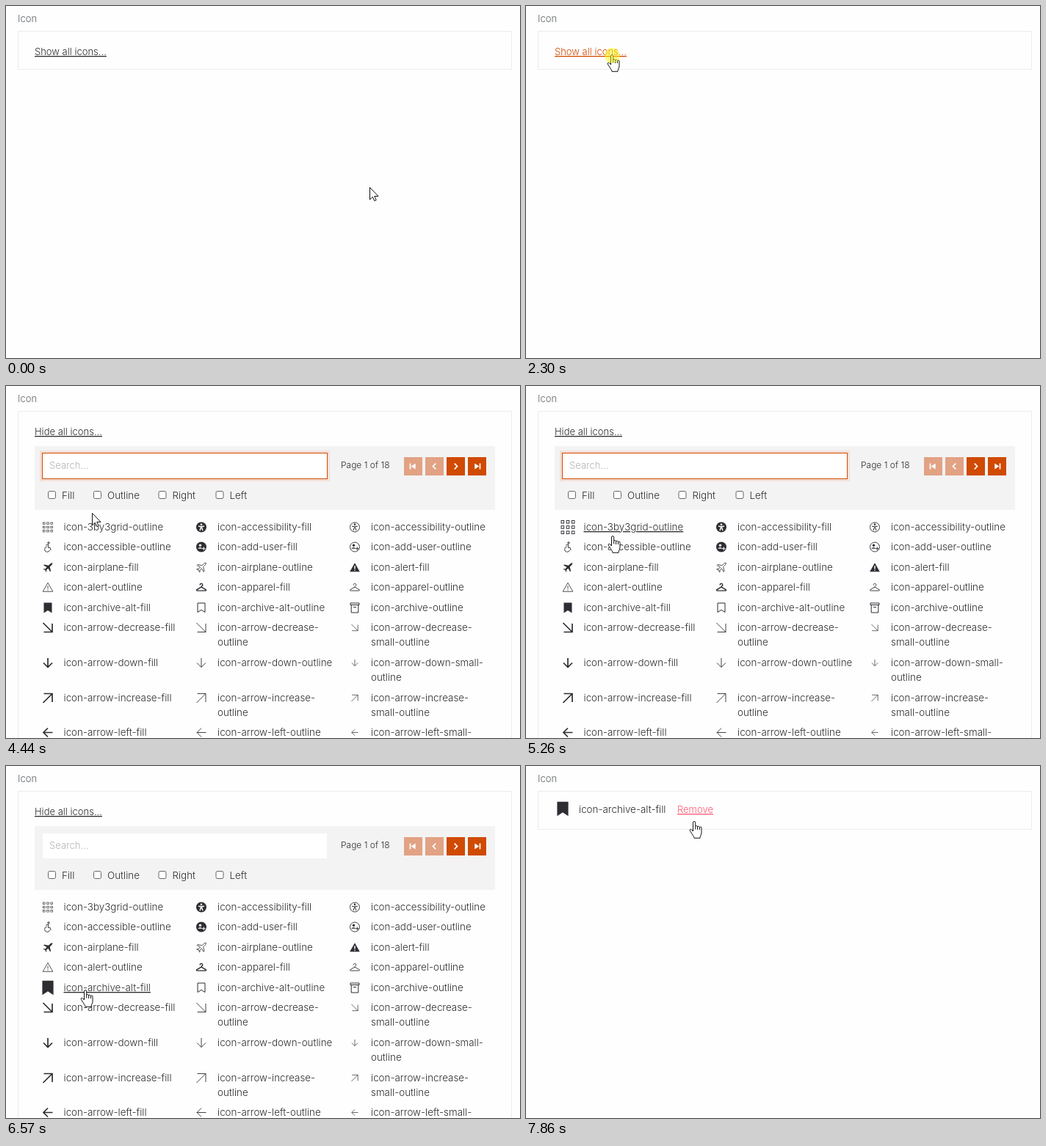
An HTML page that plays this animation: 700 px wide and 480 px high, repeating every 7990 ms.

```html
<!DOCTYPE html>
<html lang="en">
<head>
<meta charset="utf-8">
<title>Icon picker</title>
<style>
  html, body { margin: 0; width: 100%; height: 100%; overflow: hidden; background: #fefefe; }
  svg { display: block; }
  text { font: 300 13px Inter, Roboto, sans-serif; fill: #2d2d2d; }
  .list { font-size: 13.4px; }
  .link { text-decoration: underline; }
  .icon { stroke: #2d2d33; fill: none; }
  .solid { fill: #2d2d33; stroke: none; }
  .white { stroke: #fff; fill: none; }
  .dot { fill: #fff; stroke: none; }
  .cursor { fill: #fff; stroke: #111; stroke-linejoin: round; }
</style>
</head>
<body>
<svg id="stage" width="700" height="480" viewBox="0 0 700 480"></svg>
<script>
const LOOP = 7990, ORANGE = '#d04a02';
const stage = document.getElementById('stage');
const $ = id => document.getElementById(id);

const rect = (x, y, w, h, attrs) => `<rect x="${x}" y="${y}" width="${w}" height="${h}" ${attrs}/>`;
const text = (x, y, s, attrs = '') => `<text x="${x}" y="${y}" ${attrs}>${s}</text>`;
const path = (d, attrs = '') => `<path d="${d}" ${attrs}/>`;
const circle = (x, y, r, attrs = '') => `<circle cx="${x}" cy="${y}" r="${r}" ${attrs}/>`;
const at = (x, y, inner, attrs = '') => `<g transform="translate(${x} ${y})" ${attrs}>${inner}</g>`;
const scaled = (k, inner) => `<g transform="scale(${k})">${inner}</g>`;

// Icons, centred on 0,0
const grid = [-5.2, 0, 5.2].map(x => [-5.2, 0, 5.2].map(y =>
  rect(x - 1.3, y - 1.3, 2.6, 2.6, 'stroke-width=".7"')).join('')).join('');
const disc = (filled, inner) => circle(0, 0, filled ? 7 : 6.5, filled ? 'class="solid"' : 'stroke-width=".9"') +
  `<g ${filled ? 'class="white"' : ''}>${inner}</g>`;
const person = filled => disc(filled,
  circle(0, -3.8, 1.3, `class="${filled ? 'dot' : 'solid'}"`) +
  path('M-4-1.3 0-.7 4-1.3M0-1V1.2M-2 4.8-.8 1H.8L2 4.8', `stroke-width="${filled ? 1.4 : 1}"`));
const addUser = filled => disc(filled,
  circle(-1.5, -2.3, 1.7, `class="${filled ? 'dot' : 'solid'}"`) +
  path('M-5 2.3Q-1.5-1.5 1.5 2.3z', `class="${filled ? 'dot' : 'solid'}"`) +
  path('M3.3 0V4.4M1.1 2.2H5.5'));
const wheelchair = circle(1, -5.6, 1.2) +
  path('M.5-3.5-3-2.2M.5-3.5V1H3.2L4 4.5M-1.2-.4A3.6 3.6 0 1 0 2.6 4.2', 'stroke-width=".9"');
const plane = path('M7-7Q5-7.5 3-5L1-3-5.5-4.5-6.5-3.4-1.5-.5-4 2.3-6.4 2-7 2.8-4 4-2.8 7-2 6.4-2.3 4 .5 1.5 3.4 6.5 4.5 5.5 3-1 5-3Q7.5-5 7-7z');
const mark = path('M0-2.2V2') + path('M0 3.2V4.6');
const triangle = 'M0-6.2 6.8 5.8H-6.8z';
const hanger = path('M-1.8-3A1.8 1.8 0 1 1 .6-1.6Q0-1.2 0-.3L6.3 3.3Q7 4.6 5.6 4.6H-5.6Q-7 4.6-6.3 3.3L0-.3');
const bookmark = path('M-5.5-7H5.5V7L0 3.5-5.5 7z', 'class="solid"');
const archive = path('M-6-6.5H6V-4H-6zM-4.8-4V6.5H4.8V-4M-2-1H2');
const solid = s => `<g class="solid">${s}</g>`;
const weight = (w, s) => `<g stroke-width="${w}">${s}</g>`;
const arrows = d => [[1.7, 1], [.9, 1], [1, .7]].map(([w, k]) => weight(w, scaled(k, path(d))));

// y, three icons, three labels ("|" breaks a line)
const arrowRow = (y, dir, d, outline, small) => [y, arrows(d),
  ['fill', outline, small].map(kind => `icon-arrow-${dir}-${kind}`)];
const rows = [
  [192, [grid, person(true), person(false)],
    ['icon-3by3grid-outline', 'icon-accessibility-fill', 'icon-accessibility-outline']],
  [219, [wheelchair, addUser(true), addUser(false)],
    ['icon-accessible-outline', 'icon-add-user-fill', 'icon-add-user-outline']],
  [247, [solid(scaled(.9, plane)), weight(.9, scaled(.9, plane)),
      path(triangle, 'class="solid"') + `<g class="white" stroke-width="1.5">${mark}</g>`],
    ['icon-airplane-fill', 'icon-airplane-outline', 'icon-alert-fill']],
  [274, [weight(.8, path(triangle) + mark), weight(1.4, hanger), weight(.9, hanger)],
    ['icon-alert-outline', 'icon-apparel-fill', 'icon-apparel-outline']],
  [302, [bookmark, path('M-5-6.5H5V6L0 2.8-5 6z'), archive],
    ['icon-archive-alt-fill', 'icon-archive-alt-outline', 'icon-archive-outline']],
  arrowRow(329, 'decrease', 'M-6.5-6.5 6 6M6-5.5V6H-5.5', '|outline', '|small-outline'),
  arrowRow(377, 'down', 'M0-6.5V6M-6 0 0 6 6 0', 'outline', 'small-|outline'),
  arrowRow(425, 'increase', 'M-6.5 6.5 6-6M6 5.5V-6H-5.5', '|outline', '|small-outline'),
  arrowRow(472, 'left', 'M6.5 0H-6M0-6-6 0 0 6', 'outline', 'small-|outline')
];
const columns = [57, 266, 475];

const list = rows.map(([y, icons, labels], r) => columns.map((x, c) =>
  at(x, y + .5, `<g ${c ? '' : `id="icon${r}"`}>${icons[c]}</g>`, 'class="icon"') +
  labels[c].split('|').map((s, i) =>
    text(x + (c ? 22 : 21.5), y + 5 + i * 20, s, `class="list" ${c || i ? '' : `id="label${r}"`}`)).join('')
).join('')).join('');

const checks = [[57, 'Fill'], [119, 'Outline'], [207.5, 'Right'], [285.5, 'Left']].map(([x, s]) =>
  rect(x + .5, 143.5, 10, 10, 'rx="2" fill="#fff" stroke="#666"') + text(x + 19, 154, s, 'class="list"')).join('');

const bar = 'M-4-4V4', chevron = 'M-1.8-3.8 2 0-1.8 3.8', play = path('M-3.2-4V4L2.8 0z', 'class="dot"');
const flip = s => `<g transform="scale(-1 1)">${s}</g>`;
const last = play + path('M4-4V4'), next = path(chevron);
const pager = [flip(last), flip(next), next, last].map((glyph, i) =>
  rect(542 + 29 * i, 97, 25, 25, `fill="${i < 2 ? '#e2a284' : ORANGE}"`) +
  at(554.5 + 29 * i, 109.5, glyph, 'class="white" stroke-width="1.7"')).join('');

const hand = path('M5 14V2.2a1.6 1.6 0 0 1 3.2 0V7.5a1.5 1.5 0 0 1 2.9.5 1.5 1.5 0 0 1 2.8.8 1.4 1.4 0 0 1 2.6 1V16' +
  'c0 3-2 4-2 7.3H6.5c0-2-2-3.8-3-5.8L.8 13.2c-.8-1.6 1-2.6 2.2-1.4z') + path('M8.2 7.5v4M11.1 8v4M13.9 9v3');

stage.innerHTML =
  text(16, 22, 'Icon', 'style="fill:#606468"') +
  rect(16.5, 34.5, 672, 52, 'id="box" fill="none" stroke="#ececec"') +
  text(39, 67, '', 'id="toggle" class="link"') +
  `<g id="panel">
    ${rect(39, 82, 627, 87, 'fill="#f3f3f3"')}
    <g id="focus">${rect(47.5, 89.5, 392, 39, 'fill="none" stroke="#f3e0d6" stroke-width="3"')}
      ${rect(49, 91, 389, 36, `fill="${ORANGE}"`)}</g>
    ${rect(50, 92, 387, 34, 'fill="#fff"')}
    ${text(59, 113, 'Search...', 'style="fill:#b4b4b4"')}
    ${rect(59, 101, 1, 16, 'id="caret" fill="#000"')}
    ${text(456, 112, 'Page 1 of 18', 'style="font-size:12px"')}
    ${pager}${checks}${list}
  </g>
  <g id="chosen">
    ${at(50, 58.5, scaled(1.38, bookmark))}
    ${text(72, 64, 'icon-archive-alt-fill', 'class="list"')}
    ${text(206, 64, 'Remove', 'id="remove" class="link"')}
  </g>
  <g id="cursor" class="cursor">
    <g id="arrow">${path('M.5.5V17l3.8-3.7 2.5 5.4 2.4-1-2.4-5.3H12z')}</g>
    <g id="hand">${at(-.5, 0, hand)}</g>
  </g>` +
  circle(0, 0, 10.5, 'id="click" fill="#ff0" fill-opacity=".47"');

// Pointer steps: time, left, top, 1 for the hand
const pointer = [
  [0, 495, 247], [480, 350, 294], [610, 264, 265], [1240, 196, 201], [1370, 162, 150],
  [1480, 136, 108], [1600, 120, 82], [1710, 114, 70, 1], [1850, 111, 66, 1],
  [4340, 117, 84], [4440, 117, 173], [4570, 112, 190, 1], [4670, 112, 204, 1],
  [5370, 108, 240, 1], [5480, 104, 275, 1], [5590, 102, 296, 1], [5700, 102, 305, 1],
  [6700, 107, 305], [7540, 138, 240], [7650, 180, 155], [7760, 212, 97], [7860, 223, 75, 1]
];
const blinks = [[2750, 3180], [3760, 4230], [4770, 5260], [5810, 6270]];
const clicks = [[2300, 2620], [6370, 6570]];

const show = (id, on) => $(id).setAttribute('display', on ? 'inline' : 'none');

function draw(t) {
  const within = ([from, to]) => t >= from && t < to;
  const [, x, y, isHand] = pointer.findLast(p => p[0] <= t);
  const open = within([2620, 6700]), chosen = t >= 6700;

  $('cursor').setAttribute('transform', `translate(${x} ${y})`);
  show('arrow', !isHand);
  show('hand', isHand);
  show('click', clicks.some(within));
  $('click').setAttribute('transform', `translate(${x + 6.5} ${y + 1.5})`);

  $('box').setAttribute('height', open ? 500 : 52);
  show('toggle', !chosen);
  $('toggle').textContent = (open ? 'Hide' : 'Show') + ' all icons...';
  $('toggle').style.fill = isHand && y < 80 ? ORANGE : '';

  show('panel', open);
  show('focus', within([2750, 6370]));
  show('caret', blinks.some(within));
  const hovered = open && isHand && y > 180
    ? rows.findIndex(([rowY]) => Math.abs(rowY - y) < 14) : -1;
  rows.forEach((_, r) => {
    $('icon' + r).setAttribute('transform', `scale(${r === hovered ? 1.38 : 1})`);
    $('label' + r).classList.toggle('link', r === hovered);
  });

  show('chosen', chosen);
  $('remove').style.fill = isHand ? '#ff5870' : '#e0304e';
}

const start = performance.now();
function tick() {
  draw((performance.now() - start) % LOOP);
  requestAnimationFrame(tick);
}
tick();
</script>
</body>
</html>
```
